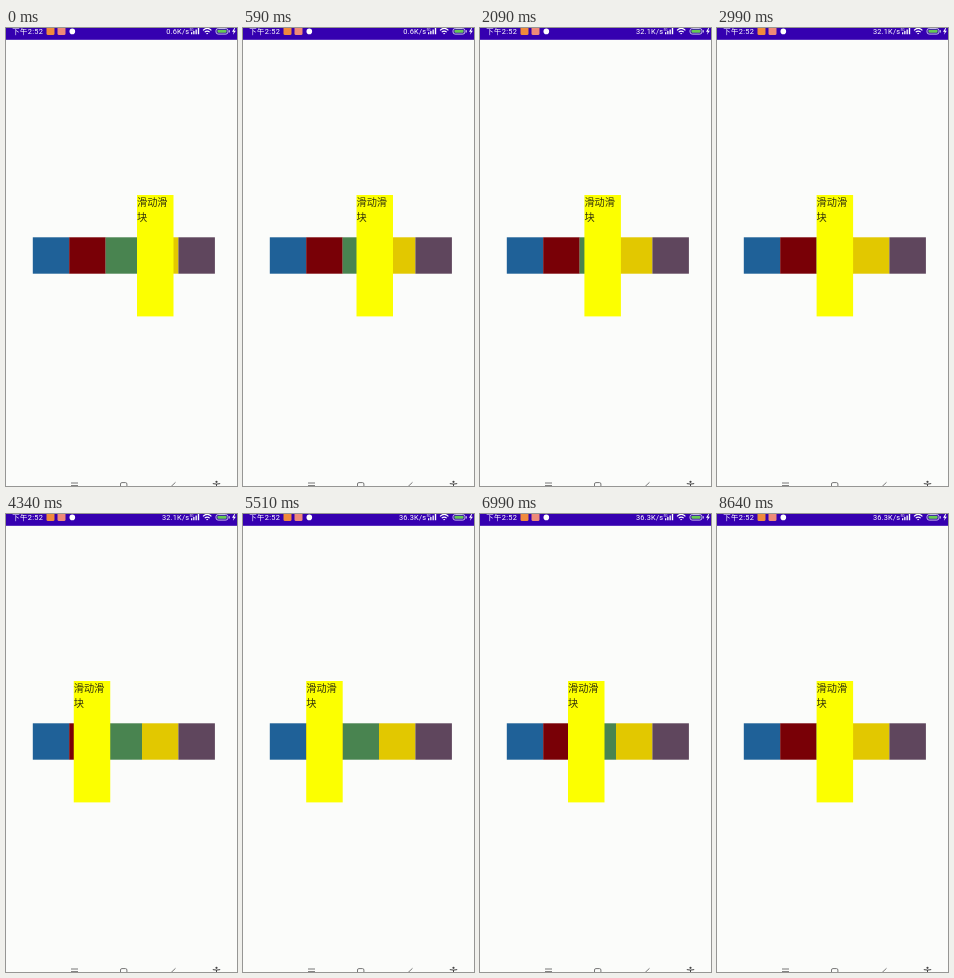
An HTML page that plays this animation: 231 by 458 pixels, repeating every 9.61 s.

```html
<!DOCTYPE html>
<html lang="zh">
<head>
<meta charset="utf-8">
<style>
html, body { margin: 0; width: 100%; height: 100%; overflow: hidden; background: #fbfcfa; }
svg { display: block; width: 231px; height: 458px; }
text { font-family: Roboto, "Noto Sans CJK SC", "Noto Sans CJK", sans-serif; }
</style>
</head>
<body>
<svg viewBox="0 0 231 458">
  <rect width="231" height="11.8" fill="#3500b0"/>
  <g fill="#fff" font-size="7.4">
    <text x="6.3" y="6.4" letter-spacing=".3">下午2:52</text>
    <text id="speed" x="183.2" y="6.2" letter-spacing=".2" text-anchor="end"></text>
    <circle cx="66.3" cy="3.4" r="2.8"/>
    <text x="183.4" y="2.8" font-size="3.4">5G</text>
    <path d="M185 6.3v-2h1.3v2zM187.2 6.3v-3.2h1.3v3.2zM189.5 6.3V1.6h1.3v4.7zM191.8 6.3V0h1.4v6.3z"/>
    <path d="M228.4 0l-2.4 3.8h1.8l-.9 3 3-4.1h-1.8l1-2.7z"/>
  </g>
  <rect x="40.5" y="-1" width="8" height="8" rx="1.5" fill="#f08a3c"/>
  <rect x="51.5" y="-1" width="8" height="8" rx="1.5" fill="#ee8a78"/>
  <g fill="none" stroke="#fff" stroke-width="1.1">
    <path d="M197 2.3q4.2-4 8.4 0M198.7 4.2q2.5-2.2 5 0M200.4 5.9q.8-.8 1.6 0"/>
    <rect x="210" y=".5" width="12" height="5.6" rx="2.2" stroke="#d5cfee" stroke-width=".9"/>
  </g>
  <rect x="211.4" y="1.8" width="9.2" height="3" rx="1" fill="#65c954"/>
  <rect x="222.8" y="2.2" width="1" height="2.3" fill="#d5cfee"/>

  <g id="blocks"></g>
  <g id="slider">
    <rect y="167" width="36.5" height="121.4" fill="#fcff00"/>
    <g fill="#34340c" font-size="10.2">
      <text y="177.7">滑动滑</text>
      <text y="192.6">块</text>
    </g>
  </g>

  <g fill="none" stroke="#777" stroke-width="1">
    <path d="M65 455h7M65 457.6h7M169.5 454.3l-4.4 4.2"/>
    <rect x="114.5" y="454.6" width="6.4" height="7" rx="1.4"/>
    <path d="M206.8 455.6q3.7 1 7.4 0M210.5 456v3" stroke="#444"/>
  </g>
  <circle cx="210.5" cy="453.8" r="1.1" fill="#444"/>
</svg>
<script>
const LOOP = 9610, TICK = 148.8;
const $ = id => document.getElementById(id);

const colors = ['#1f6198', '#790006', '#498450', '#e2c800', '#5f465d'];
const size = 36.4, left = 26.8;
const slot = i => left + i * size;

$('blocks').innerHTML = colors
  .map((c, i) => `<rect x="${slot(i)}" y="209.3" width="36.5" height="${size}" fill="${c}"/>`)
  .join('');

// Slider moves: first tick, last tick, x reached
const moves = [
  [0, 8, 111],
  [13, 17, slot(2)],
  [26, 32, slot(1)],
  [40, 47, 88],
  [49, 51, slot(2)]
];
const speeds = ['0.6', '32.1', '36.3', '38.3'];

const easeOut = p => 1 - (1 - p) ** 3;
const clamp = p => Math.max(0, Math.min(1, p));

function sliderX(tick) {
  return moves.reduce((x, [start, end, to]) =>
    x + (to - x) * easeOut(clamp((tick - start) / (end - start))), 131);
}

function draw(now) {
  const t = now % LOOP;
  const tick = Math.floor((t + 8) / TICK);
  $('slider').setAttribute('transform', `translate(${sliderX(tick)})`);
  // The readout refreshes every four seconds
  $('speed').textContent = speeds[Math.floor((t + 3300) / 4000)] + 'K/s';
  requestAnimationFrame(draw);
}
draw(0);
</script>
</body>
</html>
```
